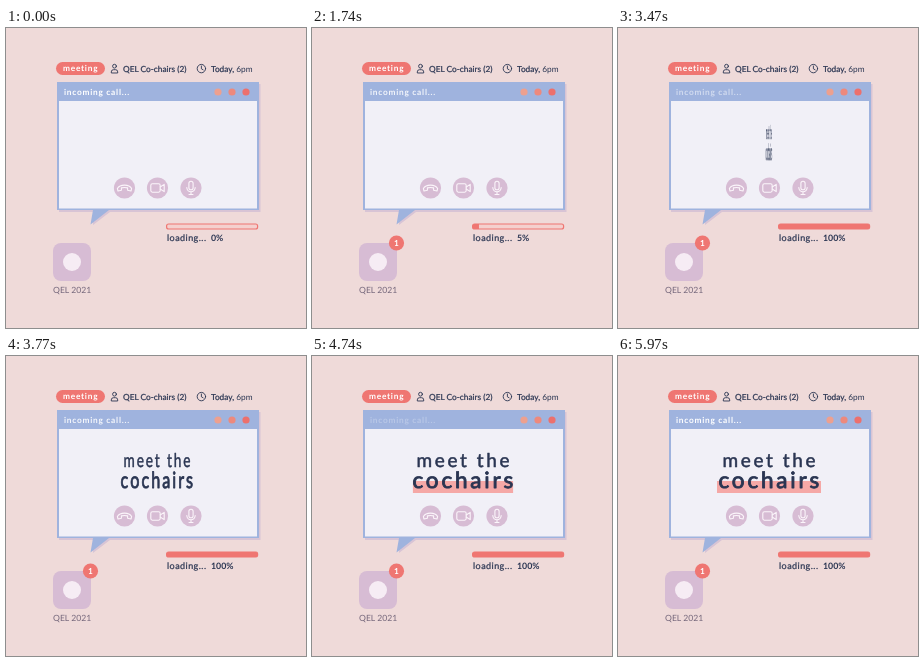
Animation of 300 by 300 pixels, one loop 6000 ms. Source, as an HTML page:

```html
<!DOCTYPE html>
<html lang="en">
<head>
<meta charset="utf-8">
<title>Incoming call</title>
<style>
  :root { --red: #ef7672; --blue: #9fb3de; --navy: #2a3552; --lilac: #d7bcd4; }
  html, body { margin: 0; width: 100%; height: 100%; overflow: hidden; background: #efdad9; }
  svg { display: block; width: 100vw; height: 100vh; }
  text { font-family: Lato, "Open Sans", sans-serif; font-size: 8.3px; fill: var(--navy); text-rendering: geometricPrecision; }
  .bold { font-weight: 700; }
  .semi { stroke: var(--navy); stroke-width: .22px; }
  .light { fill: #fff; font-weight: 700; }
  .wide { letter-spacing: .75px; }
  .line { fill: none; stroke: var(--navy); stroke-width: .9; stroke-linecap: round; stroke-linejoin: round; }
  .icon { fill: none; stroke: #fbf5fa; stroke-width: 1.1; stroke-linecap: round; stroke-linejoin: round; }
  #title text { text-anchor: middle; stroke: var(--navy); stroke-linejoin: round; }
</style>
</head>
<body>
<svg viewBox="0 0 300 300">
  <rect width="300" height="300" fill="#efdad9"/>

  <!-- top line -->
  <rect x="50" y="34" width="49" height="13" rx="6.5" fill="var(--red)"/>
  <text class="light wide" x="57" y="43.3">meeting</text>
  <g class="line">
    <circle cx="108.5" cy="38.2" r="1.9"/>
    <path d="M105.3 44.6v-.7a2.2 2.2 0 0 1 2.2-2.2h2a2.2 2.2 0 0 1 2.2 2.2v.7z"/>
    <circle cx="195.4" cy="40.6" r="4.2"/>
    <path d="M195.4 38v2.8l1.7 1"/>
  </g>
  <text class="semi" x="117" y="43.8">QEL Co-chairs (2)</text>
  <text x="205" y="43.8"><tspan class="semi">Today,</tspan> 6pm</text>

  <!-- call window -->
  <path d="M53 56H254.5V184H104L87 197V184H53Z" fill="#d8c4d5"/>
  <path d="M51 54H253V182H103L84.5 196.5L87 182H51Z" fill="var(--blue)"/>
  <rect x="53" y="73" width="198" height="107.5" fill="#f1f0f7"/>
  <text id="call" class="light wide" x="58" y="67">incoming call...</text>
  <circle cx="212" cy="64" r="3.6" fill="#eda08f"/>
  <circle cx="226" cy="64" r="3.6" fill="#ed897d"/>
  <circle cx="240" cy="64" r="3.6" fill="#ec706d"/>

  <g fill="var(--lilac)">
    <circle cx="118.5" cy="160" r="10.6"/>
    <circle cx="151.5" cy="160" r="10.6"/>
    <circle cx="185" cy="160" r="10.6"/>
  </g>
  <g class="icon">
    <path d="M111.4 160.6C114 156 123 156 125.6 160.6L125 163L121.6 162.2V159.9Q118.5 159 115.4 159.9V162.2L112 163Z"/>
    <rect x="144.8" y="155.8" width="9.4" height="8.4" rx="1.6"/>
    <path d="M154.2 159l4-2.6v7.2l-4-2.6"/>
    <rect x="182.9" y="153.2" width="4.2" height="8.6" rx="2.1"/>
    <path d="M180.8 159.6a4.2 4.2 0 0 0 8.4 0M185 163.9v2.6M183 166.5h4"/>
  </g>

  <rect id="mark" x="-52" y="125" width="104" height="12" fill="#f5a8a6"/>
  <g id="title">
    <text x="1.3" y="111" style="font-size:19px;letter-spacing:2.6px;stroke-width:.5px">meet the</text>
    <text x="1.2" y="132" style="font-size:22.5px;letter-spacing:2.8px;stroke-width:.9px">cochairs</text>
  </g>

  <!-- progress -->
  <rect x="160.6" y="196" width="91" height="5" rx="2" fill="#f4d0ce"/>
  <clipPath id="track"><rect x="160.6" y="196" width="91" height="5" rx="2"/></clipPath>
  <rect id="bar" x="160.6" y="196" height="5" fill="var(--red)" clip-path="url(#track)"/>
  <rect x="160.6" y="196" width="91" height="5" rx="2" fill="none" stroke="var(--red)" stroke-width="1.2"/>
  <text class="semi" x="161" y="213" style="font-size:9px;letter-spacing:.45px">loading...</text>
  <text id="percent" class="bold" x="205" y="213" style="font-size:8.8px">0%</text>

  <!-- app -->
  <rect x="47" y="215" width="38" height="38" rx="8" fill="var(--lilac)"/>
  <circle cx="66" cy="234" r="9" fill="#f6ecf4"/>
  <text x="47" y="264.5" style="font-size:8.6px;fill:#75677b">QEL 2021</text>
  <g id="badge">
    <circle r="7.6" fill="var(--red)"/>
    <text class="light" y="3" text-anchor="middle">1</text>
  </g>
</svg>
<script>
  const LOOP = 6000;
  const $ = id => document.getElementById(id);
  const [call, mark, title, bar, percent, badge] =
    ["call", "mark", "title", "bar", "percent", "badge"].map($);

  // Eased progress from 0 to 1 between two times
  const ease = (t, from, to) => {
    const u = Math.min(1, Math.max(0, (t - from) / (to - from)));
    return u * u * (3 - 2 * u);
  };
  const unfold = (el, k) => el.setAttribute("transform", `translate(151 0) scale(${k} 1)`);

  function draw(t) {
    call.setAttribute("opacity", 0.56 + 0.44 * Math.cos(t / 2000 * 2 * Math.PI));
    badge.setAttribute("transform", `translate(84.5 215) scale(${ease(t, 800, 1100)})`);
    bar.setAttribute("width", 91 * ease(t, 1535, 2810));
    percent.textContent = Math.round(100 * ease(t, 1550, 2960)) + "%";
    unfold(title, ease(t, 3380, 3980));
    unfold(mark, ease(t, 4210, 4810));
  }

  const start = performance.now();
  function tick(now) {
    draw(Math.max(0, now - start) % LOOP);
    requestAnimationFrame(tick);
  }
  draw(0);
  requestAnimationFrame(tick);
</script>
</body>
</html>
```
